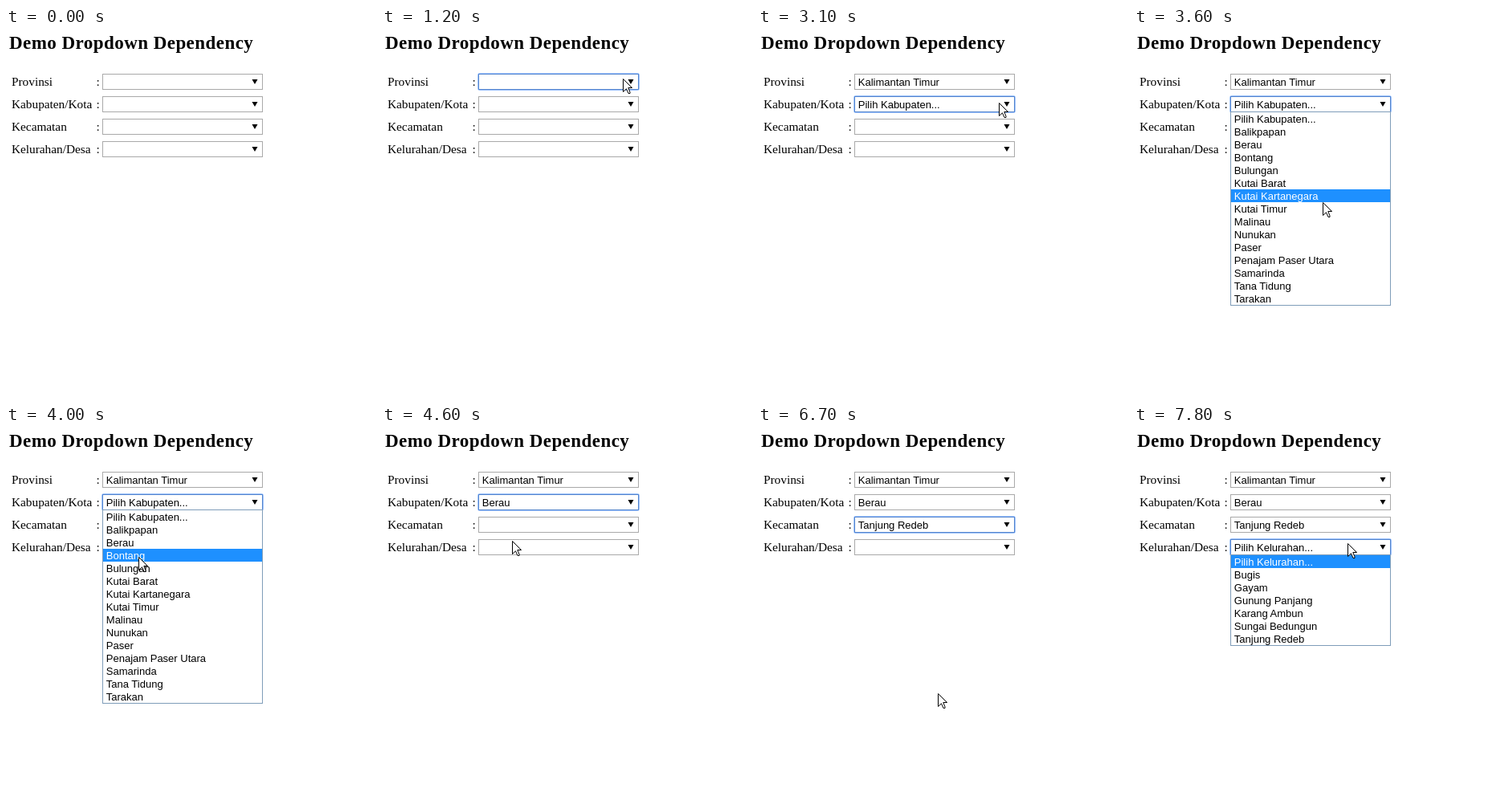
These frames come from a looping animation (461 px wide and 461 px high, 8 s). An HTML page:

```html
<!DOCTYPE html>
<html lang="id">
<head>
<meta charset="utf-8">
<title>Demo Dropdown Dependency</title>
<style>
  html, body { margin: 0; width: 100%; height: 100%; overflow: hidden; background: #fff; }
  svg { display: block; width: 100%; height: 100%; }
  text { font: 13px "Liberation Sans", Arial, sans-serif; white-space: pre; }
  .title { font: bold 23px "Liberation Serif", "Times New Roman", serif; letter-spacing: .45px; }
  .label { font: 15.3px "Liberation Serif", "Times New Roman", serif; }
</style>
</head>
<body>
<svg viewBox="0 0 461 461">
  <text class="title" x="4" y="26">Demo Dropdown Dependency</text>
  <g id="form"></g>
</svg>
<script>
const LOOP = 8000, STEP = 100, LOAD = 500;
const LEFT = 120, WIDTH = 200, ROW = 16, TEXT_X = 124.8;

const fields = [
  { label: 'Provinsi', open: 1200, close: 2000, pick: 2100, choice: 'Kalimantan Timur',
    options: ['', 'Kalimantan Timur'] },
  { label: 'Kabupaten/Kota', open: 3100, close: 4300, pick: 4300, choice: 'Berau',
    options: ['Pilih Kabupaten...', 'Balikpapan', 'Berau', 'Bontang', 'Bulungan', 'Kutai Barat',
      'Kutai Kartanegara', 'Kutai Timur', 'Malinau', 'Nunukan', 'Paser', 'Penajam Paser Utara',
      'Samarinda', 'Tana Tidung', 'Tarakan'] },
  { label: 'Kecamatan', open: 5500, close: 6700, pick: 6700, choice: 'Tanjung Redeb',
    options: ['Pilih Kecamatan...', 'Batu Putih', 'Biatan', 'Biduk-Biduk', 'Gunung Tabur', 'Kelay',
      'Maratua', 'Pulau Derawan', 'Sambaliung', 'Segah', 'Tabalar', 'Talisayan',
      'Tanjung Redeb', 'Teluk Bayur'] },
  { label: 'Kelurahan/Desa', open: 7600, close: LOOP, pick: LOOP,
    options: ['Pilih Kelurahan...', 'Bugis', 'Gayam', 'Gunung Panjang', 'Karang Ambun',
      'Sungai Bedungun', 'Tanjung Redeb'] }
];
// A choice in one field loads the options of the next
fields.forEach((f, i) => {
  f.y = 57 + 28 * i;
  f.fill = i ? fields[i - 1].pick + LOAD : 0;
});

// Pointer moves: start, end, x, y; it rests in between
const ENTER = 600;
const moves = [
  [ENTER, 1000, 300, 63], [1300, 1900, 243, 96],
  [2100, 2400, 391, 219], [2400, 2900, 300, 93],
  [3200, 3600, 235, 217], [3600, 3700, 222, 268], [3700, 4100, 155, 143],
  [4300, 4600, 162, 143], [4600, 4900, 346, 145], [4900, 5300, 287, 118],
  [5700, 6200, 224, 333], [6700, 6900, 318, 350], [6900, 7400, 266, 146]
];

const ease = k => k * (1.5 - k / 2);

function pointerAt(t) {
  let x = 412, y = 160;
  for (const [start, end, toX, toY] of moves) {
    if (t <= start) break;
    const k = ease(Math.min(1, (t - start) / (end - start)));
    x += (toX - x) * k;
    y += (toY - y) * k;
  }
  return [Math.round(x), Math.round(y)];
}

const box = (x, y, w, h, style) => `<rect x="${x}" y="${y}" width="${w}" height="${h}" ${style}/>`;
const text = (x, y, s, style = '') => `<text x="${x}" y="${y}" ${style}>${s}</text>`;

function drawField(f, t, focused) {
  const value = t >= f.pick ? f.choice : t >= f.fill ? f.options[0] : '';
  const ring = focused
    ? box(LEFT - .5, f.y - .5, WIDTH + 1, 21, 'rx="2" fill="none" stroke="#4d90fe" stroke-opacity=".55"') : '';
  return text(7, f.y + 15, f.label, 'class="label"') + text(112.5, f.y + 15, ':', 'class="label"') +
    box(LEFT + .5, f.y + .5, WIDTH - 1, 19, `fill="#fff" stroke="${focused ? '#5585cc' : '#a9a9a9'}"`) +
    ring + text(TEXT_X, f.y + 15, value) +
    `<path d="M306.5 ${f.y + 7}h7l-3.5 6z"/>`;
}

function drawList(f, t, pointerY) {
  const top = f.y + 20, height = f.options.length * ROW;
  const active = Math.max(0, Math.floor((pointerY - top - 1) / ROW));
  const rows = f.options.map((s, i) => {
    const y = top + i * ROW, on = i === active;
    return (on ? box(LEFT + 1, y, WIDTH - 2, ROW, 'fill="#1e90ff"') : '') +
      text(TEXT_X, y + 13, s, on ? 'fill="#fff"' : '');
  }).join('');
  const cx = LEFT + WIDTH / 2, cy = top + height / 2;
  const popping = t < f.open + 2 * STEP;
  const pose = popping
    ? `opacity=".6" transform="translate(${cx} ${cy}) scale(.98) translate(${-cx} ${-cy})"` : '';
  const edge = popping ? 'stroke="#888" stroke-width="2"' : 'stroke="#7f9db9"';
  return `<g ${pose}>` +
    box(LEFT + .5, top - .5, WIDTH - 1, height + 1, `fill="#fff" ${edge}`) + rows + '</g>';
}

const drawPointer = (x, y) =>
  `<path transform="translate(${x} ${y})" fill="#fff" stroke="#000"
    d="M.5 .5V16.5L4.5 12.8 7 18.5H9V17L6.8 11.5H11.5Z"/>`;

const form = document.getElementById('form');
let shown = -1;

function draw(t) {
  const focus = fields.filter(f => t >= f.open).pop();
  let out = fields.map(f => drawField(f, t, f === focus)).join('');
  if (t >= ENTER) {
    const [x, y] = pointerAt(t);
    if (focus && t >= focus.open + STEP && t < focus.close) out += drawList(focus, t, y);
    out += drawPointer(x, y);
  }
  form.innerHTML = out;
}

function tick() {
  const t = Math.floor(performance.now() % LOOP / STEP) * STEP;
  if (t !== shown) draw(shown = t);
  requestAnimationFrame(tick);
}
tick();
</script>
</body>
</html>
```
